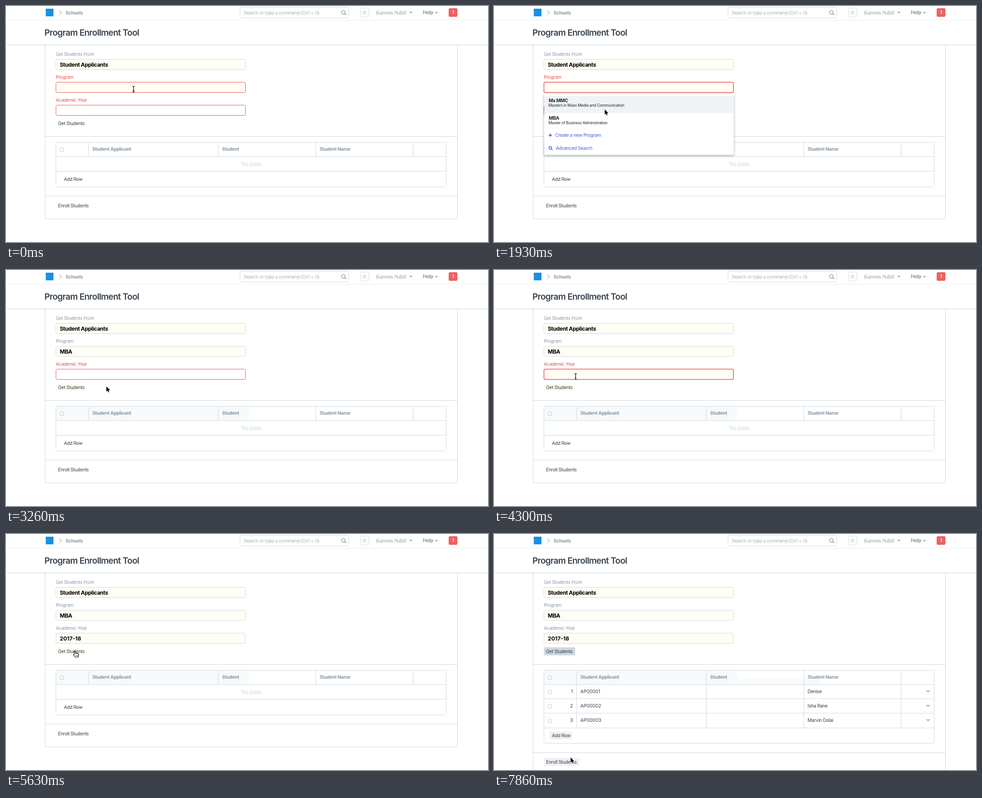
Recreate the animation shown at these times as an HTML page with a canvas. Size 1066 by 525 pixels, loop 8 s.

```html
<!DOCTYPE html>
<html lang="en">
<head>
<meta charset="utf-8">
<title>Program Enrollment Tool</title>
<style>
html, body { margin: 0; width: 100%; height: 100%; overflow: hidden; background: #fff; }
canvas { display: block; }
</style>
</head>
<body>
<canvas id="stage" width="1066" height="525"></canvas>
<script>
const ctx = document.getElementById('stage').getContext('2d');
const LOOP = 8000, STEP = 148.15;
const LINE = '#d1d8dd', GREY = '#8d99a6', DARK = '#36414c', RED = '#ec5252',
      BLUE = '#4a5ae8', CREAM = '#fffdf4', HOVER = '#f0f3f6', TINT = '#f6fafb';

// step, x, y, shape: the pointer moves linearly between these
const POINTER = [
  [0, 282, 185, 'beam'], [3, 281, 185, 'beam'], [8, 281, 185, 'beam'], [9, 274, 194, 'arrow'],
  [16, 223, 257, 'arrow'], [17, 222.5, 258, 'arrow'], [18, 222, 259, 'hand'],
  [21, 222, 259, 'arrow'], [23, 222, 259, 'arrow'], [27, 186, 243, 'beam'],
  [29, 180.5, 237, 'beam'], [31, 180.5, 237, 'beam'], [32, 176, 243, 'arrow'],
  [34, 161, 259, 'hand'], [36, 161, 259, 'hand'], [39, 147, 262, 'hand'],
  [44, 147, 262, 'hand'], [46, 149, 270, 'arrow'], [48, 149, 270, 'arrow'],
  [53, 169.5, 497, 'arrow']
];
const SHAPES = {
  arrow: new Path2D('M0 0V11.5L2.6 9.2 4.4 13.2 6.2 12.4 4.5 8.5H8.2Z'),
  hand: new Path2D('M-1 .5Q0-1 1.2 .5L2.5 5 3.5 4Q5 3.6 5.5 4.8Q7 4.2 7.6 5.6Q9 5.2 9 7V9.5L7.5 13H1.5L-2.5 8Q-2.4 6.6-.5 7.2Z'),
  beam: new Path2D('M-3-6.5Q0-6.5 0-4.5Q0-6.5 3-6.5M0-5V5M-3 6.5Q0 6.5 0 4.5Q0 6.5 3 6.5M-1.5 2.5H1.5')
};

// cy is the middle of the capital letters
function text(str, x, cy, size = 10.3, color = DARK, weight = 400, align = 'left', family = 'Inter, sans-serif') {
  ctx.font = `${weight} ${size}px ${family}`;
  ctx.letterSpacing = /\d|Karee/.test(str) ? '0px' : `${-0.034 * size}px`;
  ctx.textAlign = align;
  ctx.fillStyle = color;
  ctx.fillText(str, x, cy + size * 0.364);
}

function fill(x, y, w, h, color, radius = 0) {
  ctx.fillStyle = color;
  ctx.beginPath();
  ctx.roundRect(x, y, w, h, radius);
  ctx.fill();
}

function box(x, y, w, h, radius = 3, color = LINE, width = 1) {
  ctx.strokeStyle = color;
  ctx.lineWidth = width;
  ctx.beginPath();
  ctx.roundRect(x + .5, y + .5, w, h, radius);
  ctx.stroke();
}

const hline = (x, y, w, color = LINE) => fill(x, y, w, 1, color);
const vline = (x, y, h, color = LINE) => fill(x, y, 1, h, color);

function stroke(d, color, width) {
  ctx.strokeStyle = color;
  ctx.lineWidth = width;
  ctx.stroke(new Path2D(d));
}

function triangle(x, y, w, h, color) {
  ctx.fillStyle = color;
  ctx.fill(new Path2D(`M${x} ${y}h${w}l${-w / 2} ${h}z`));
}

function drawHeader() {
  fill(88, 6, 17, 17, '#1791e2');
  stroke('M117.5 9.5l5.5 5.2-5.5 5.2', '#a9b4be', 1.1);
  text('Schools', 132, 15, 10.4, GREY, 700);
  box(517, 2, 240, 24);
  text('Search or type a command (Ctrl + G)', 526, 15, 10.3, '#a8b1ba');
  stroke('M750 14a4 4 0 1 0-8 0a4 4 0 1 0 8 0M749 17l3.5 3.5', '#737f8b', 1.2);
  box(784, 4, 18.5, 20);
  text('K', 793.5, 14.5, 11.5, '#b8c2cc', 400, 'center');
  text('Kareem Nabil', 818.5, 14.5, 11.8, GREY, 400, 'left', 'Liberation Serif, serif');
  triangle(892, 13, 6.5, 3.5, GREY);
  text('Help', 922, 14.5, 10.8, GREY, 700);
  triangle(949, 13.5, 6.5, 3.5, GREY);
  fill(979, 5, 19.5, 19, '#ee6060', 3);
  text('1', 988.7, 14.5, 10.5, '#fff', 600, 'center');
  hline(0, 31, 1066, '#e9edf0');
  text('Program Enrollment Tool', 85, 59, 18.9, DARK, 600);
  hline(0, 86, 1066);
}

function drawField(label, y, value, { missing, focus, cream, caret }) {
  text(label, 110, y - 11, 10.3, missing ? RED : GREY);
  if (cream) fill(110.5, y + .5, 419, 23, CREAM, 3);
  box(110, y, 419, 23, 3, missing ? RED : LINE, focus ? 1.5 : 1);
  if (value) text(value, 119, y + 12.5, 12.2, '#000', 700);
  if (caret) vline(119, y + 6, 13, '#000');
}

function drawTable(k, loaded) {
  const bottom = loaded ? 465 : 402, panelEnd = loaded ? 486 : 422;
  hline(86, 290, 912);
  hline(86, panelEnd, 912);
  vline(86, 87, loaded ? 438 : 386);
  vline(998, 87, loaded ? 438 : 386);
  if (!loaded) hline(86, 473, 913);

  if (k >= 21) fill(111, 304, 426, 30, TINT);
  if (k >= 50) fill(537, 323, 185, 11, TINT);
  box(110, 303, 863, bottom - 303);
  const gridEnd = loaded ? 431 : 334;
  for (const x of [182, 469, 685, 900]) vline(x, 303, gridEnd - 303);
  for (let y = 334; y <= (loaded ? 431 : 367); y += loaded ? 32.2 : 33) hline(111, Math.round(y), 862);
  box(119, 315, 8, 8, 1, '#c3cad1');
  text('Student Applicant', 191, 318.5, 10.4, GREY, 700);
  text('Student', 478, 318.5, 10.4, GREY, 700);
  text('Student Name', 693.5, 318.5, 10.4, GREY, 700);

  if (loaded) {
    ['Denise', 'Isha Rane', 'Marvin Dolai'].forEach((name, i) => {
      const y = 350.5 + 32 * i;
      box(119, y - 3.5, 8, 8, 1, '#c3cad1');
      text(String(i + 1), 174.5, y, 10.3, DARK, 400, 'right');
      text('AP0000' + (i + 1), 191, y);
      text(name, 693.5, y);
      triangle(955, y - 2.5, 10, 5.5, '#bcc3ca');
    });
    fill(123, 439, 50, 18, '#f0f1f4', 2);
    fill(110.5, 498, 78, 18, '#f0f1f4', 2);
  } else {
    text('No Data', 542, 351.5, 12, '#d1d8dd', 400, 'center');
  }
  text('Add Row', 128, loaded ? 448 : 385);
  text('Enroll Students', 115, loaded ? 507.5 : 444);
}

function panel(y, h) {
  ctx.save();
  ctx.shadowColor = 'rgba(0,0,0,.32)';
  ctx.shadowBlur = 6;
  ctx.shadowOffsetY = 2;
  fill(111, y, 419, h, '#fff', [0, 0, 3, 3]);
  ctx.restore();
}

function createLink(label, cy) {
  stroke(`M121 ${cy}h7M124.5 ${cy - 3.5}v7`, BLUE, 1.8);
  text(label, 135, cy, 10.3, BLUE);
}

function drawProgramList(k) {
  panel(195, 136);
  if (k >= 11) fill(111, 200, 418, 38, HOVER);
  if (k >= 15) {
    fill(111, 238, 418, 38, HOVER);
    fill(121, 197, 163, 3, '#f5f7f9');
    fill(121, 276, 166, 3, '#f5f7f9');
  }
  text('Ms MMC', 121, 210.5, 10.3, '#1f272e', 700);
  text('Masters in Mass Media and Communication', 120.5, 221, 8.7, '#1f272e');
  text('MBA', 121, 249, 10.3, '#1f272e', 700);
  text('Master of Business Administration', 120.5, 259.5, 8.7, '#1f272e');
  createLink('Create a new Program', 287.5);
  stroke('M127.5 315.5a3 3 0 1 0-6 0a3 3 0 1 0 6 0M126.8 317.8l3 3', BLUE, 1.5);
  text('Advanced Search', 136.5, 316.5, 10.3, BLUE);
}

function drawYearList(k) {
  panel(247, 159);
  if (k >= 33) fill(111, 248, 418, 28, HOVER);
  for (let i = 0; i < 5; i++) text(`${2017 - i}-${18 - i}`, 120.5, 261.8 + 28.8 * i, 10.4, '#1f272e', 700);
  ctx.save();
  ctx.beginPath();
  ctx.rect(111, 247, 419, 159);
  ctx.clip();
  createLink('Create a new Academic Year', 406);
  ctx.restore();
}

function drawPointer(k) {
  let i = POINTER.length - 1;
  while (POINTER[i][0] > k) i--;
  const a = POINTER[i], b = POINTER[i + 1] || a;
  const p = b === a ? 0 : (k - a[0]) / (b[0] - a[0]);
  const shape = SHAPES[a[3]];
  ctx.save();
  ctx.translate(a[1] + (b[1] - a[1]) * p, a[2] + (b[2] - a[2]) * p);
  ctx.lineJoin = 'round';
  ctx.lineWidth = a[3] === 'arrow' ? 2 : a[3] === 'beam' ? 2.6 : 1.1;
  ctx.strokeStyle = a[3] === 'hand' ? '#000' : '#fff';
  ctx.fillStyle = a[3] === 'hand' ? '#fff' : '#000';
  if (a[3] === 'hand') ctx.fill(shape);
  ctx.stroke(shape);
  if (a[3] === 'arrow') ctx.fill(shape);
  if (a[3] === 'beam') {
    ctx.lineWidth = 1.2;
    ctx.strokeStyle = '#000';
    ctx.stroke(shape);
  }
  if (a[3] === 'hand') {
    ctx.lineWidth = .8;
    ctx.stroke(new Path2D('M3 8.5v2.5M5 8.5v2.5M7 8.5v2.5'));
  }
  ctx.restore();
}

function draw(now) {
  const k = Math.min(53, Math.floor((now % LOOP + 10) / STEP));
  const hasProgram = k >= 21, hasYear = k >= 36, loaded = k >= 41;
  const programOpen = k >= 7 && !hasProgram, yearOpen = k >= 30 && !hasYear;
  const blink = k % 6 >= 3;

  fill(0, 0, 1066, 525, '#fff');
  drawHeader();
  drawField('Get Students From', 118, 'Student Applicants', { cream: true });
  drawField('Program', 169, hasProgram && 'MBA',
    { missing: !hasProgram, focus: k >= 6 && !hasProgram, cream: true });
  if (k >= 15 && programOpen) fill(120, 174, 132, 16, '#eff2f6');
  if (programOpen && blink) vline(119, 175, 13, '#000');
  drawField('Academic Year', 220, hasYear && '2017-18',
    { missing: !hasYear, focus: k >= 28 && !hasYear, cream: k >= 27, caret: yearOpen && blink });
  if (hasProgram) fill(110.5, 252, 69, 18, k >= 39 ? '#cfd8df' : CREAM, 2);
  text('Get Students', 115, 261);
  drawTable(k, loaded);
  if (programOpen) drawProgramList(k);
  if (yearOpen) drawYearList(k);
  drawPointer(k);
}

function tick() {
  draw(performance.now());
  requestAnimationFrame(tick);
}
tick();
</script>
</body>
</html>
```
